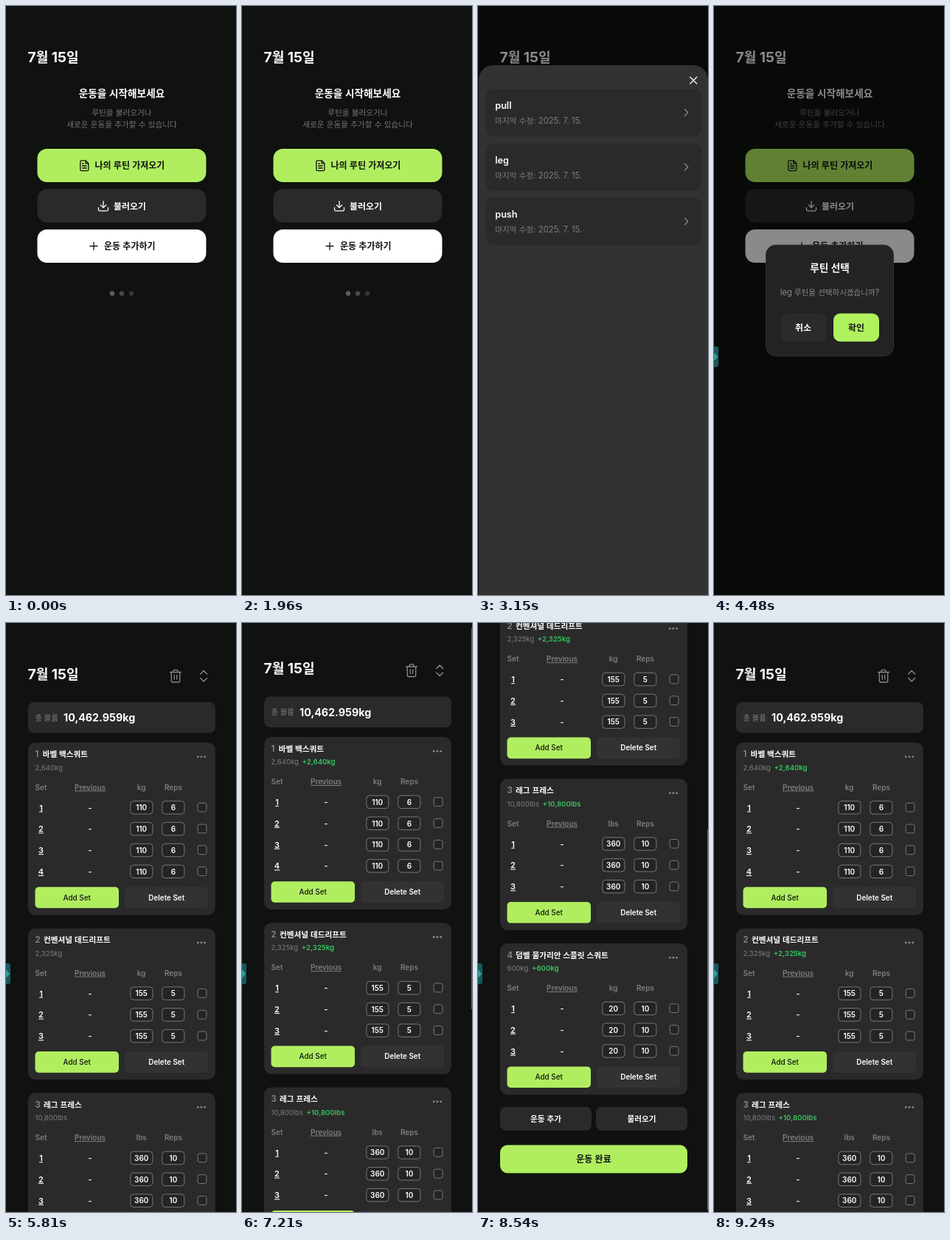
An HTML page for the animation above (9.73 s loop, 312 px wide and 796 px high).

```html
<!DOCTYPE html>
<html lang="ko">
<head>
<meta charset="utf-8">
<title>운동 기록</title>
<style>
  html, body { margin: 0; width: 100%; height: 100%; overflow: hidden; background: #0f120f; }
  svg { display: block; width: 100vw; height: 100vh; }
  text { font-family: Inter, "Noto Sans CJK KR", "Noto Sans CJK", sans-serif; white-space: pre; }
  .ko { font-size: .94em; }
</style>
</head>
<body>
<svg id="stage" viewBox="0 0 312 796"></svg>
<script>
const LOOP = 9730, STEP = 70;
const LIME = '#b0ee60', CARD = '#2a2a2a', GREY = '#7d7d7d', INK = '#111411';

const hangul = s => s.replace(/[가-힣]+/g, m => `<tspan class="ko">${m}</tspan>`);
const text = (x, y, size, weight, fill, s, anchor = 'start', extra = '') =>
  `<text x="${x}" y="${y}" font-size="${size}" font-weight="${weight}" fill="${fill}" text-anchor="${anchor}" ${extra}>${hangul(s)}</text>`;
const mid = (x, y, size, weight, fill, s, extra) => text(x, y, size, weight, fill, s, 'middle', extra);
const rect = (x, y, w, h, r, fill, extra = '') =>
  `<rect x="${x}" y="${y}" width="${w}" height="${h}" rx="${r}" fill="${fill}" ${extra}/>`;
const line = (d, stroke, width = 1.3) =>
  `<path d="${d}" fill="none" stroke="${stroke}" stroke-width="${width}" stroke-linecap="round" stroke-linejoin="round"/>`;
const dot = (x, y, r, fill) => `<circle cx="${x}" cy="${y}" r="${r}" fill="${fill}"/>`;
const group = (id, body) => `<g id="${id}">${body}</g>`;
const UNDERLINE = 'text-decoration="underline"';

const title = text(29.5, 75.5, 19.2, 700, '#fff', '7월 15일');
const page = rect(0, 0, 312, 796, 0, '#0f120f');

const home = page + title +
  mid(157, 122.6, 14.5, 600, '#fff', '운동을 시작해보세요') +
  mid(157, 147.5, 11.3, 400, '#737573', '루틴을 불러오거나') +
  mid(157, 163.5, 11.3, 400, '#737573', '새로운 운동을 추가할 수 있습니다') +
  rect(42.5, 193, 229, 45, 13, LIME) +
  line('M108 208.8h-5.5q-1.7 0-1.7 1.7v10.5q0 1.7 1.7 1.7h7.7q1.7 0 1.7-1.7v-8.3zv4h4M103.7 216h5.4M103.7 219h5.4M103.7 213h1.6', INK) +
  text(120.5, 220, 12.8, 600, INK, '나의 루틴 가져오기') +
  rect(42.5, 247.5, 229, 45, 13, CARD) +
  line('M132 264v8.6m-3.6-3.6l3.6 3.6 3.6-3.6M125.5 272.5v2.8q0 1.5 1.5 1.5h10q1.5 0 1.5-1.5v-2.8', '#fff') +
  text(146, 274.5, 12.7, 600, '#fff', '불러오기') +
  rect(42.5, 302, 229, 45, 13, '#fff') +
  line('M114 324.5h10m-5-5v10', INK) +
  text(133, 328.8, 12.8, 600, INK, '운동 추가하기') +
  dot(144, 388.5, 3.2, '#5c5e5c') + dot(157, 388.5, 3.2, '#484a48') + dot(170, 388.5, 3.2, '#353735');

const routine = (name, i) => {
  const y = 32 + i * 73.5;
  return rect(11, y, 292, 64, 9, CARD) +
    text(23.3, y + 27.2, 12.6, 600, '#fff', name) +
    text(23.3, y + 47, 11.3, 400, GREY, '마지막 수정: 2025. 7. 15.') +
    line(`M280.5 ${y + 27.5}l4.3 4.5-4.3 4.5`, '#8a8a8a', 1.2);
};
const sheet = rect(1, 0, 311, 900, 20, '#323232') +
  line('M287.8 16l9 9m0-9l-9 9', '#fff', 1.2) +
  ['pull', 'leg', 'push'].map(routine).join('');

const modal = rect(70.5, 323, 173, 150, 13, '#232323', 'stroke="#343434"') +
  mid(157, 358.5, 14.5, 700, '#fff', '루틴 선택') +
  mid(157, 391, 11.2, 400, '#8a8a8a', 'leg 루틴을 선택하시겠습니까?') +
  rect(90.5, 415.5, 62, 38, 9, '#2b2b2b') + mid(121, 438.8, 12.7, 600, '#fff', '취소') +
  rect(162, 415.5, 62, 38, 9, '#b0f25e') + mid(193, 438.8, 12.7, 600, INK, '확인');

const exercises = [
  ['바벨 백스쿼트', '2,640', 'kg', 110, 6, 4],
  ['컨벤셔널 데드리프트', '2,325', 'kg', 155, 5, 3],
  ['레그 프레스', '10,800', 'lbs', 360, 10, 3],
  ['덤벨 불가리안 스플릿 스쿼트', '600', 'kg', 20, 10, 3],
];
const ROW = 28.8;
const box = (x, y, w, h, r) => rect(x, y, w, h, r, '#242424', 'stroke="#777"');

function setRow(i, weight, reps) {
  const y = 88 + i * ROW;
  return mid(47.5, y + 4, 10.9, 600, '#fff', `${i + 1}`, UNDERLINE) +
    mid(114, y + 4, 10.9, 600, '#fff', '-') +
    box(168.9, y - 8.8, 30, 17.4, 4) + mid(183.7, y + 3.7, 10, 600, '#fff', `${weight}`) +
    box(211.9, y - 8.8, 30, 17.4, 4) + mid(226.9, y + 3.7, 10, 600, '#fff', `${reps}`) +
    box(260.2, y - 6.2, 11.8, 11.8, 2.5);
}

let cardTop = 161.5;
function exercise([name, volume, unit, weight, reps, sets], i) {
  const height = 118 + sets * ROW, by = 80 + sets * ROW, head = [10, 600, GREY];
  const gain = `<tspan class="gain" dx="4.5" font-weight="600" fill="#36c560">+${volume}${unit}</tspan>`;
  let body = rect(30, 0, 254, height, 10, CARD) +
    text(39.5, 19.5, 11.3, 600, '#fff', `<tspan fill="#8a8a8a">${i + 1}</tspan><tspan dx="4.5"> </tspan>`.replace('> <', '><') ) +
    text(i ? 51 : 49.7, 19.5, 11.3, 600, '#fff', name) +
    text(39.5, 37, 9.6, 400, GREY, volume + unit + gain) +
    [260.3, 265, 269.7].map(x => dot(x, 19.3, 1.4, '#8a8a8a')).join('') +
    text(39.5, 64, ...head, 'Set') + mid(114, 64, ...head, 'Previous', UNDERLINE) +
    mid(183.7, 64, ...head, unit) + mid(227, 64, ...head, 'Reps') +
    rect(39.5, by, 113.5, 28.6, 5, LIME) + mid(96.2, by + 17.9, 9.9, 500, INK, 'Add Set') +
    rect(161, by, 113, 28.6, 5, '#323232') + mid(217.7, by + 17.9, 9.9, 600, '#fff', 'Delete Set');
  for (let n = 0; n < sets; n++) body += setRow(n, weight, reps);
  const card = `<g transform="translate(0 ${cardTop})">${body}</g>`;
  cardTop += height + 18;
  return card;
}

const workout = title +
  line('M222.5 66.5h15M224.3 66.5v11.5q0 2 2 2h7.4q2 0 2-2v-11.5M227 66.5v-1.5q0-1.7 1.7-1.7h2.6q1.7 0 1.7 1.7v1.5M228.3 70.5v5.5M231.7 70.5v5.5', '#8a8a8a') +
  line('M263.8 69l4.4-4.4 4.4 4.4M263.8 74.6l4.4 4.4 4.4-4.4', '#8a8a8a', 1.4) +
  rect(30, 107, 254, 41.5, 8, CARD) +
  text(39.5, 131.8, 10.9, 500, GREY, '총 볼륨') +
  text(78, 133, 14.3, 700, '#fff', '10,462.959kg') +
  exercises.map(exercise).join('') +
  rect(30, 1078.5, 124, 32, 8, CARD) + mid(92, 1098.6, 11.3, 600, '#fff', '운동 추가') +
  rect(160, 1078.5, 124, 32, 8, CARD) + mid(222, 1098.6, 11.3, 600, '#fff', '불러오기') +
  rect(30, 1130, 254, 38, 10, LIME) + mid(157, 1153.6, 12.8, 600, INK, '운동 완료');

const stage = document.getElementById('stage');
stage.innerHTML = group('home', home) +
  rect(0, 0, 312, 796, 0, '#000', 'id="dim"') +
  group('sheet', sheet) + group('modal', modal) +
  group('workout', page + group('scroller', workout) +
    rect(311, 2, 1, 515, .5, '#fff', 'id="thumb" opacity=".35"')) +
  group('tab', '<path d="M0 460h3q3 0 3 3v22q0 3-3 3h-3z" fill="#17595e"/><path d="M0 470l1-1 4 5-4 5-1-1z" fill="#35a09c"/>');

const el = id => document.getElementById(id);
const [homeEl, dim, sheetEl, modalEl, workoutEl, scroller, thumb, tab] =
  ['home', 'dim', 'sheet', 'modal', 'workout', 'scroller', 'thumb', 'tab'].map(el);
const gains = stage.querySelectorAll('.gain');
const show = (node, on) => node.setAttribute('display', on ? 'inline' : 'none');
const moveY = (node, y) => node.setAttribute('transform', `translate(0 ${y})`);
const clamp = v => Math.max(0, Math.min(1, v));

// time, scroll offset
const scrollKeys = [[7140, 0], [7280, 15], [7490, 95], [7630, 215], [7700, 215],
  [7910, 427], [8400, 427], [8540, 424.5], [8541, 0], [LOOP, 0]];
function scrollAt(t) {
  const i = scrollKeys.findIndex(k => k[0] > t);
  if (i < 1) return 0;
  const [t0, a] = scrollKeys[i - 1], [t1, b] = scrollKeys[i];
  return a + (b - a) * (t - t0) / (t1 - t0);
}

function draw(t) {
  const rise = clamp((t - 2450) / 577), asking = t >= 4410, training = t >= 5810;
  const opened = t >= 2590;
  show(homeEl, !training);
  show(dim, opened && !training);
  dim.setAttribute('opacity', asking ? .46 : .46 * clamp(rise * 1.25));
  show(sheetEl, opened && !asking);
  moveY(sheetEl, 80 + 716 * (1 - rise) ** 3);
  show(modalEl, asking && !training);
  modalEl.setAttribute('opacity', t < 4480 ? .5 : 1);
  show(workoutEl, training);
  show(tab, asking);
  gains.forEach(g => show(g, t >= 5880));
  const scroll = scrollAt(t);
  moveY(scroller, -scroll);
  show(thumb, t >= 7210 && t < 9240);
  moveY(thumb, scroll * .65);
}

const start = performance.now();
function tick() {
  const t = (performance.now() - start) % LOOP;
  draw(Math.floor(t / STEP) * STEP);
  requestAnimationFrame(tick);
}
tick();
</script>
</body>
</html>
```
